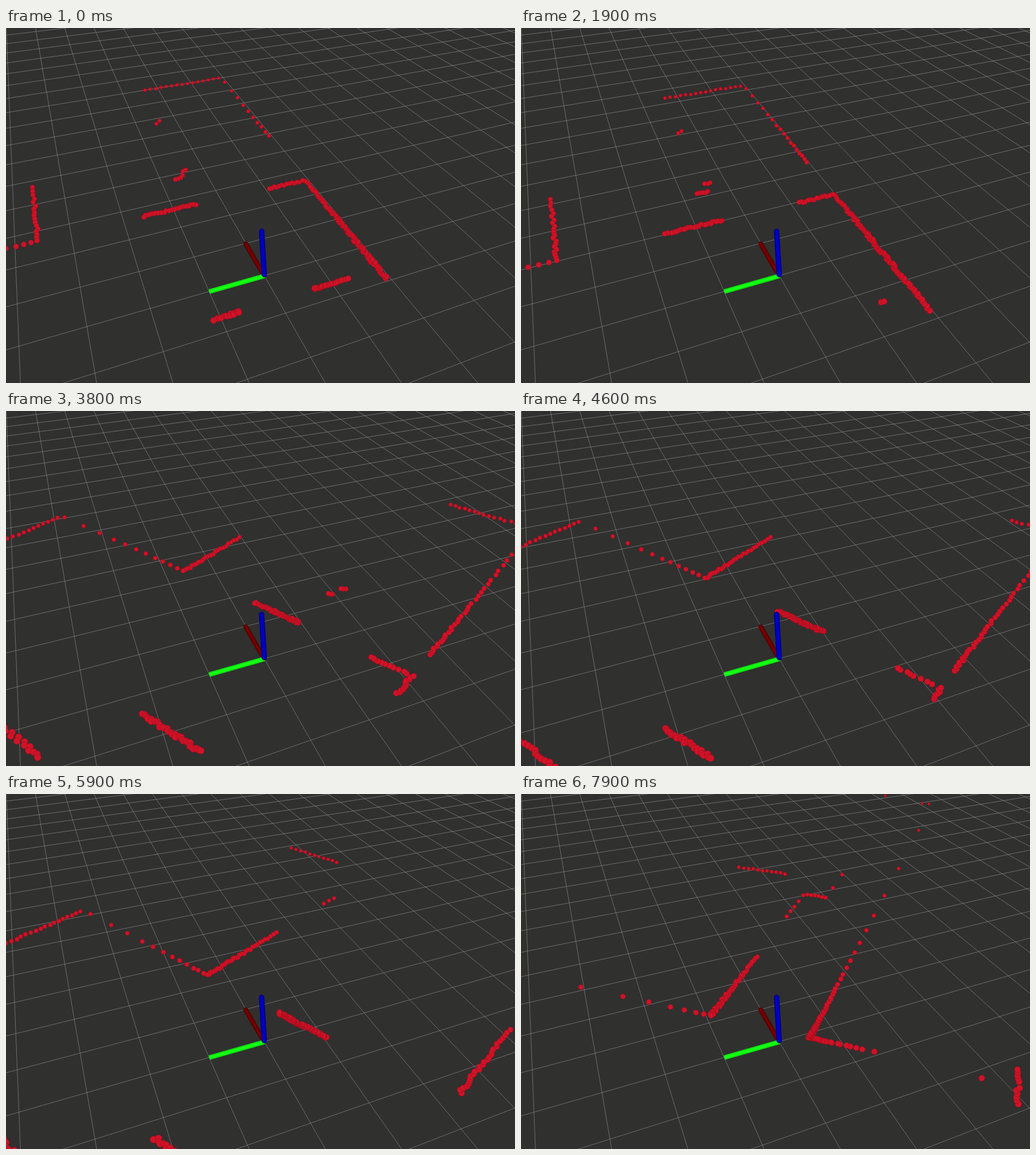
Write an HTML page with a canvas that moves like this. It is 896 px wide and 625 px high and loops after 8 s.

```html
<!DOCTYPE html>
<html>
<head>
<meta charset="utf-8">
<style>
  html, body { margin: 0; width: 100%; height: 100%; overflow: hidden; background: #30302f; }
  canvas { display: block; }
</style>
</head>
<body>
<canvas id="view" width="896" height="625"></canvas>
<script>
const ctx = document.getElementById('view').getContext('2d');
const LOOP = 8000, TICK = 100, SCANS_PER_TICK = .8125, MAX_RANGE = 20;

// Square-cornered wall in metres: start x, y, then y, x, y, x ... by turns
function wall(x, y, ...turns) {
  return turns.map((to, i) => {
    const from = [x, y];
    if (i % 2) x = to; else y = to;
    return [...from, x, y];
  });
}

const SEGMENTS = [
  wall(-2.1, 1, 8, 2.66, 3.6, 4.88),           // side corridor
  wall(15.9, 2.1, 1.64, 2.66, .5),             // hallway
  wall(9.9, 3.1, 3.02, 7.87, 3.62, 6.6),
  wall(8.85, 3.7, 6.9),
  wall(16.3, 3.35, 3.5),
  wall(9, .45, -1.93, -1.7),                   // long room
  wall(-.67, 1.14, -1.35),
  wall(2.6, -1.08, -1.93),
  wall(3.8, .9, .5, 4.1, .36),                 // furniture
  wall(6.7, .53, .4, 7.2)
].flat();

// Time, x, y
const WAYPOINTS = [
  [0, 0, 0], [1100, .34, 0], [2700, 1.02, .09],
  [3800, 1.47, .39], [5300, 1.74, 1.06], [7900, 2.39, 2.12]
];

const ramp = (t, from, to) => Math.min(1, Math.max(0, (t - from) / (to - from)));

function poseAt(t) {
  const next = Math.max(1, WAYPOINTS.findIndex(p => p[0] >= t));
  const [t0, x0, y0] = WAYPOINTS[next - 1], [t1, x1, y1] = WAYPOINTS[next];
  const k = ramp(t, t0, t1);
  const heading = 1.04 * ramp(t, 2380, 3600) + .12 * ramp(t, 5300, 6600) - .425 * ramp(t, 6600, 7900);
  return [x0 + (x1 - x0) * k, y0 + (y1 - y0) * k, heading];
}

// Ground plane (x forward, y left) to screen
function project(x, y) {
  const depth = 1 + .0741 * x - .0327 * y;
  return [(454.6 - 1.11 * x - 108.7 * y) / depth, 825 / depth - 389, depth];
}

function noise(n) {
  const v = Math.sin(n * 12.9898) * 43758.5453;
  return v - Math.floor(v) - .5;
}

function castRay(px, py, angle) {
  const dx = Math.cos(angle), dy = Math.sin(angle);
  let nearest = MAX_RANGE;
  for (const [x1, y1, x2, y2] of SEGMENTS) {
    const sx = x2 - x1, sy = y2 - y1, det = dx * sy - dy * sx;
    const ox = x1 - px, oy = y1 - py;
    const range = (ox * sy - oy * sx) / det, along = (ox * dy - oy * dx) / det;
    if (range > 0 && along >= 0 && along <= 1) nearest = Math.min(nearest, range);
  }
  return nearest;
}

function line(a, b) {
  ctx.beginPath();
  ctx.moveTo(a[0], a[1]);
  ctx.lineTo(b[0], b[1]);
  ctx.stroke();
}

function drawGrid() {
  ctx.lineCap = 'butt';
  ctx.lineWidth = 1;
  ctx.strokeStyle = 'rgba(160,160,164,.55)';
  for (let x = -5; x <= 24; x++) line(project(x, 6), project(x, -22));
  for (let y = -22; y <= 6; y++) line(project(-5, y), project(24, y));
}

// One laser sweep over 270 degrees
function drawScan(scan) {
  const started = Math.max(0, Math.ceil((scan - .5) / SCANS_PER_TICK)) * TICK;
  const [px, py, heading] = poseAt(started);
  ctx.fillStyle = '#d11327';
  ctx.strokeStyle = 'rgba(150,10,26,.6)';
  ctx.lineWidth = 1;
  for (let i = -135; i < 135; i++) {
    const bearing = (i + .35) * Math.PI / 180;
    let range = castRay(px, py, heading + bearing);
    if (range === MAX_RANGE) continue;
    range += noise(i + 400 + scan * 271) * .07;
    const [x, y, depth] = project(range * Math.cos(bearing), range * Math.sin(bearing));
    ctx.beginPath();
    ctx.arc(x, y, 5.3 / depth - .3, 0, 7);
    ctx.fill();
    ctx.stroke();
  }
}

function drawRod(a, b, width, edge, core, cap) {
  ctx.lineCap = cap;
  ctx.lineWidth = width;
  ctx.strokeStyle = edge;
  line(a, b);
  ctx.lineWidth = width * .55;
  ctx.strokeStyle = core;
  line(a, b);
}

function drawAxes() {
  drawRod([452, 432], [422, 380], 8.5, '#500000', '#760000', 'round');
  drawRod([455, 436.5], [358, 464], 8.5, '#0fdc0f', '#14ff14', 'butt');
  drawRod([454.5, 434], [450, 358], 9.5, '#000088', '#0000c8', 'round');
}

function frame() {
  const tick = Math.floor(performance.now() % LOOP / TICK);
  ctx.fillStyle = '#30302f';
  ctx.fillRect(0, 0, 896, 625);
  drawGrid();
  drawScan(Math.floor(tick * SCANS_PER_TICK + .5));
  drawAxes();
  requestAnimationFrame(frame);
}
frame();
</script>
</body>
</html>
```
